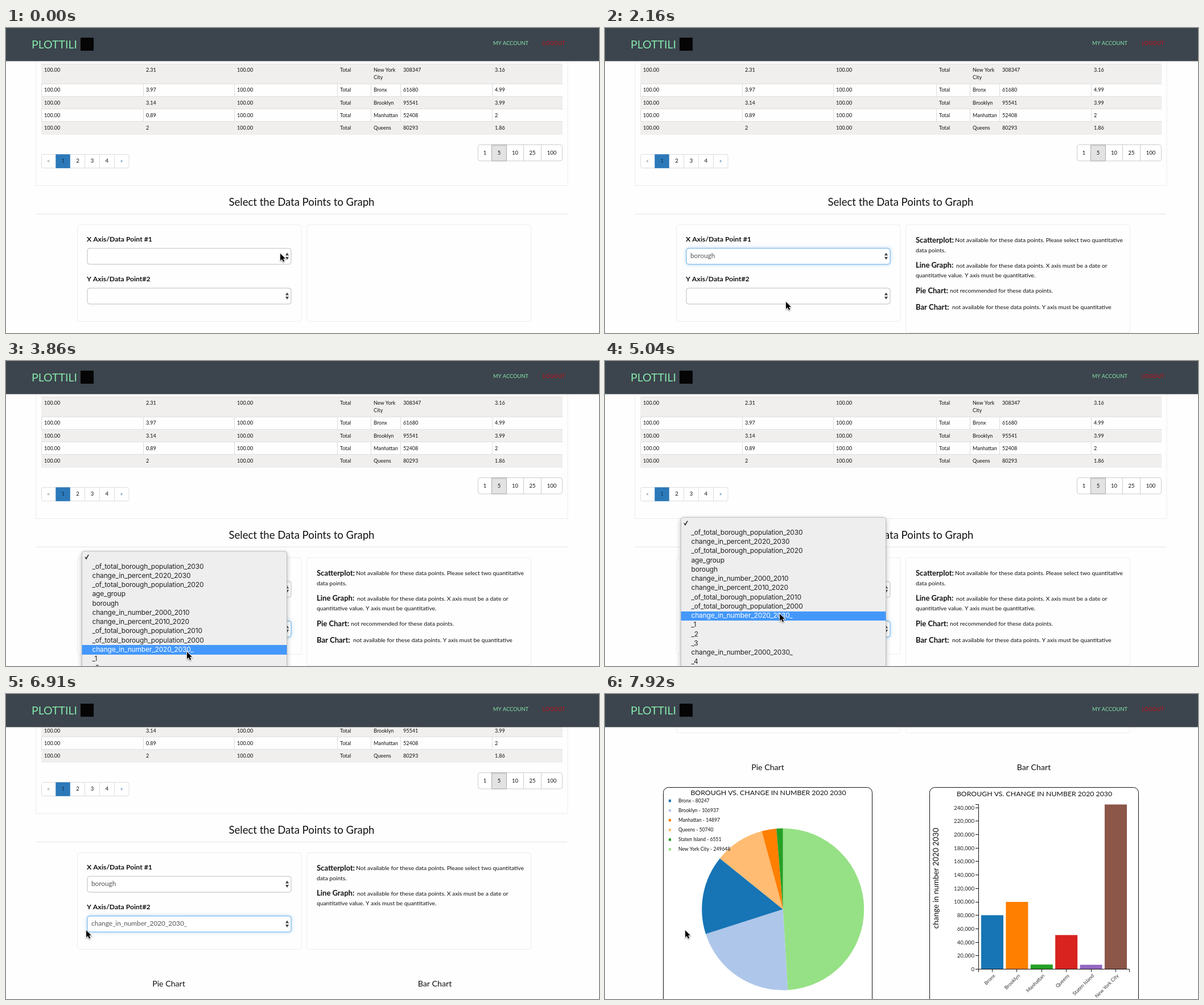
Animation, 1042 px wide and 537 px high, one loop 8000 ms. Source, as an HTML page with a canvas:

```html
<!DOCTYPE html>
<html lang="en">
<head>
<meta charset="utf-8">
<title>Data point selection</title>
<style>
html, body { margin: 0; width: 100%; height: 100%; overflow: hidden; background: #fefefe; }
canvas { display: block; width: 1042px; height: 537px; }
</style>
</head>
<body>
<canvas id="stage"></canvas>
<script>
const W = 1042, H = 537, LOOP = 8000;
const canvas = document.getElementById('stage');
const ctx = canvas.getContext('2d');
const ratio = window.devicePixelRatio || 1;
canvas.width = W * ratio;
canvas.height = H * ratio;

const SANS = 'Lato, sans-serif', MENU_FONT = 'Inter, sans-serif';
const ROW = 16.25;

const options = ['', '_of_total_borough_population_2030', 'change_in_percent_2020_2030',
  '_of_total_borough_population_2020', 'age_group', 'borough', 'change_in_number_2000_2010',
  'change_in_percent_2010_2020', '_of_total_borough_population_2010',
  '_of_total_borough_population_2000', 'change_in_number_2020_2030_', '_1', '_2', '_3',
  'change_in_number_2000_2030_', '_4', '_5'];

const cities = [
  ['2.31', 'New York', '308347', '3.16'],
  ['3.97', 'Bronx', '61680', '4.99'],
  ['3.14', 'Brooklyn', '95541', '3.99'],
  ['0.89', 'Manhattan', '52408', '2'],
  ['2', 'Queens', '80293', '1.86']
];

const legend = [
  ['Bronx', 80247, '#1775b5'], ['Brooklyn', 106937, '#aec6ea'], ['Manhattan', 14897, '#ff7f00'],
  ['Queens', 50740, '#ffbc72'], ['Staten Island', 6551, '#24a024'], ['New York City', 249648, '#96e185']
];
const sliceOrder = [5, 1, 0, 3, 2, 4];
const barHeights = [80247, 100000, 6900, 50740, 6551, 244800];
const barColors = ['#1775b5', '#ff7f00', '#24a024', '#d8231f', '#9467c0', '#8c5649'];

// Pointer path: time, x, y
const pointer = [
  [0, 482, 397], [150, 482, 398], [320, 455, 401], [490, 400, 407], [660, 352, 413], [830, 330, 420],
  [1130, 326, 455], [1270, 322, 466], [1420, 316, 477], [1570, 313, 483],
  [2020, 318, 482], [2180, 327, 480], [2330, 338, 478], [2490, 349, 475], [2640, 356, 473],
  [3120, 352, 490], [3265, 340, 514], [3410, 330, 528],
  [3710, 326, 530], [3855, 318, 512], [4000, 312, 491],
  [4450, 311, 481], [4600, 310, 471], [4750, 309, 460], [4890, 308, 451], [5040, 307, 445],
  [5940, 290, 442], [6120, 228, 431], [6290, 168, 420], [6470, 141, 416]
];
const scrolls = [[0, 0], [6910, 67], [7060, 141], [7250, 226], [7430, 298], [7600, 355], [7770, 407], [7920, 448]];
const menuTops = [[0, 390], [2940, 460], [3710, 400], [3855, 335], [4000, 275.3]];

function held(keys, t) {
  let k = keys[0];
  for (const key of keys) if (key[0] <= t) k = key;
  return k;
}

function text(str, x, y, size, o = {}) {
  ctx.font = `${o.weight || 400} ${size}px ${o.font || SANS}`;
  ctx.letterSpacing = o.spacing || '0px';
  ctx.fillStyle = o.color || '#111';
  ctx.textAlign = o.align || 'left';
  ctx.fillText(str, x, y + size * 0.35);
}

function rotated(str, x, y, angle, size, o) {
  ctx.save();
  ctx.translate(x, y);
  ctx.rotate(angle);
  text(str, 0, 0, size, o);
  ctx.restore();
}

function fill(x, y, w, h, color) {
  ctx.fillStyle = color;
  ctx.fillRect(x, y, w, h);
}

function box(x, y, w, h, r, stroke, color) {
  ctx.beginPath();
  ctx.roundRect(x, y, w, h, r);
  if (color) { ctx.fillStyle = color; ctx.fill(); }
  if (stroke) { ctx.strokeStyle = stroke; ctx.lineWidth = 1; ctx.stroke(); }
}

function shadowBox(x, y, w, h, r, color, shadow, blur, drop) {
  ctx.save();
  ctx.shadowColor = shadow;
  ctx.shadowBlur = blur * ratio;
  ctx.shadowOffsetY = drop * ratio;
  box(x, y, w, h, r, null, color);
  ctx.restore();
}

function path(points, color) {
  ctx.beginPath();
  points.forEach(([x, y], i) => i ? ctx.lineTo(x, y) : ctx.moveTo(x, y));
  ctx.closePath();
  ctx.fillStyle = color;
  ctx.fill();
}

function drawNav() {
  fill(0, 0, W, 58.4, '#3c444d');
  text('PLOTTILI', 45, 29, 19.5, { color: '#86e8ac' });
  fill(131, 17, 23, 23, '#050505');
  text('MY ACCOUNT', 856, 27, 9.3, { color: '#86e8ac' });
  text('LOGOUT', 943, 27, 9.5, { color: '#c4101a' });
}

function drawTable() {
  const cols = [62, 241, 401, 582, 641, 693, 854];
  const rowTop = i => i ? Math.round(76.5 + 22.2 * i) : 64;
  box(52.5, -200.5, 934.5, 478, 0, '#ececec');
  cities.forEach(([pct, name, count, share], i) => {
    const top = rowTop(i), h = rowTop(i + 1) - top;
    if (i % 2 === 0) fill(62, top, 916, h, '#f0efee');
    else cols.forEach(x => fill(x, top, 1, h, '#dcdcdc'));
    fill(62, top - 1, 916, 1, '#dfdfdf');
    const y = i ? 87 + 22.2 * i : 74;
    ['100.00', pct, '100.00', 'Total', name, count, share]
      .forEach((s, c) => text(s, cols[c] + 5, y, 9));
    if (!i) text('City', 646, 87, 9);
  });
}

function drawPagers() {
  box(62.5, 222.5, 153.5, 24, 3, '#ddd', '#fff');
  [112.5, 138.5, 164.5, 190.5].forEach(x => fill(x - .5, 223, 1, 24, '#ddd'));
  fill(87.3, 222.4, 25.4, 24.4, '#2c79b9');
  ['«', '1', '2', '3', '4', '»'].forEach((s, i) =>
    text(s, 74.5 + 25.7 * i, 234, 9.5, { align: 'center', color: ['#777', '#14304a', '#111', '#111', '#111', '#2c6ca8'][i] }));

  box(829.5, 205.5, 148, 28.5, 4, '#ccc', '#fff');
  box(853.5, 205.5, 26, 28.5, 0, '#adadad', '#e3e3e3');
  fill(854, 206, 25, 2, '#d2d2d2');
  [909, 940].forEach(x => fill(x, 206, 1, 28, '#ccc'));
  ['1', '5', '10', '25', '100'].forEach((s, i) =>
    text(s, [841.5, 866.5, 894.5, 925, 959][i], 219.5, 9.5, { align: 'center' }));
}

function drawSelect(y, value, focused) {
  if (focused) shadowBox(143, y + .5, 358, 28, 4, '#fff', 'rgba(102,175,233,.6)', 7, 0);
  box(143, y + .5, 358, 28, 4, focused ? '#66afe9' : '#bdbdbd', '#fff');
  text(value, 150, y + 13.5, 11.8, { color: '#555' });
  path([[491, y + 13], [494, y + 8], [497, y + 13]], '#444');
  path([[491, y + 15.5], [497, y + 15.5], [494, y + 20.5]], '#444');
}

function drawInfo(t) {
  const items = [
    ['Scatterplot:', 615, 373.5, 'Not available for these data points. Please select two quantitative', 'data points.'],
    ['Line Graph:', 617, 418, 'not available for these data points. X axis must be a date or', 'quantitative value. Y axis must be quantitative.'],
    ['Pie Chart:', 606, 462.5, 'not recommended for these data points.', ''],
    ['Bar Chart:', 610, 491.5, 'not available for these data points. Y axis must be quantitative', '']
  ];
  items.slice(0, t < 5940 ? 4 : 2).forEach(([head, x, y, first, second]) => {
    text(head, 546, y - .5, 13, { weight: 700 });
    text(first, x, y, 10.3);
    text(second, 546, y + 17.5, 10.3);
  });
}

function drawForm(t) {
  const chosen = t >= 1870, plotted = t >= 5940;
  text('Select the Data Points to Graph', 519.5, 306.5, 18.5, { align: 'center' });
  fill(53, 327, 933, 1, '#e2e2e2');
  box(125.5, 346.5, 393.5, 170, 4, '#ededed');
  box(528.5, 346.5, 394, chosen && !plotted ? 190 : 170, 4, '#ededed');
  text('X Axis/Data Point #1', 142, 372, 12.2, { weight: 700 });
  text('Y Axis/Data Point#2', 142, 442, 12.2, { weight: 700 });
  drawSelect(387.5, chosen ? 'borough' : '', t >= 150 && t < 2940);
  drawSelect(457.5, plotted ? options[10] : '', t >= 3120);
  if (chosen) drawInfo(t);
}

function drawPie() {
  const cx = 312.7, cy = 827, r = 142.5;
  const total = legend.reduce((sum, item) => sum + item[1], 0);
  text('Pie Chart', 286, 577.5, 14.2, { align: 'center' });
  box(102.5, 612.5, 367, 480, 9, '#111', '#fff');
  text('BOROUGH VS. CHANGE IN NUMBER 2020 2030', 287, 622, 12.3, { align: 'center' });
  let angle = -Math.PI / 2;
  for (const i of sliceOrder) {
    const next = angle + legend[i][1] / total * 2 * Math.PI;
    ctx.beginPath();
    ctx.moveTo(cx, cy);
    ctx.arc(cx, cy, r, angle, next);
    ctx.fillStyle = legend[i][2];
    ctx.fill();
    angle = next;
  }
  legend.forEach(([name, value, color], i) => {
    const y = 635.8 + 17.1 * i;
    fill(112, y - 2, 4, 4.5, color);
    text(`${name} - ${value}`, 129, y, 8.55);
  });
}

function drawBars() {
  const base = 932.5, unit = 284.3 / 240000;
  text('Bar Chart', 753.5, 577.5, 14.2, { align: 'center' });
  box(570.5, 612.5, 367, 480, 9, '#111', '#fff');
  text('BOROUGH VS. CHANGE IN NUMBER 2020 2030', 754.5, 623.5, 12.3, { align: 'center' });
  rotated('change in number 2020 2030', 581, 772.5, -Math.PI / 2, 13.7, { align: 'center' });

  barHeights.forEach((v, i) => {
    const x = 661 + 43.4 * i;
    fill(x, base - v * unit, 39, v * unit, barColors[i]);
    fill(Math.round(x + 19), base, 1, 5, '#111');
    rotated(legend[i][0], x + 23, 942.5, -Math.PI / 4, 8.7, { align: 'right', color: '#333' });
  });
  for (let v = 0; v <= 240000; v += 20000) {
    const y = base - v * unit;
    fill(651, Math.round(y - .5), 5, 1, '#111');
    text(v.toLocaleString('en-US'), 649, y, 9.7, { align: 'right', color: '#222' });
  }
  ctx.strokeStyle = '#111';
  ctx.lineWidth = 1;
  ctx.beginPath();
  ctx.moveTo(651, 642.5);
  ctx.lineTo(656.5, 642.5);
  ctx.lineTo(656.5, 937.5);
  ctx.moveTo(656.5, base);
  ctx.lineTo(921.5, base);
  ctx.lineTo(921.5, 937.5);
  ctx.stroke();
}

function drawMenu(top, pointerY) {
  const first = top + 2.8;
  const active = Math.floor((pointerY - first) / ROW);
  const h = H + 40 - top;
  shadowBox(133.5, top, 360, h, 4, '#eeeeee', 'rgba(0,0,0,.32)', 9, 3);
  box(133.5, top, 360, h, 4, '#bdbdbd');
  options.forEach((name, i) => {
    const rowTop = Math.round(first + ROW * i);
    const y = first + ROW * (i + .5) - .7, on = i === active;
    const color = on ? '#fff' : '#222';
    if (on) fill(133.5, rowTop, 360, Math.round(first + ROW * (i + 1)) - rowTop, '#4498fb');
    text(name, 151.5, y, 12, { font: MENU_FONT, color, spacing: '-0.17px' });
    if (i) return;
    ctx.beginPath();
    ctx.moveTo(139, y);
    ctx.lineTo(141, y + 3);
    ctx.lineTo(145, y - 4);
    ctx.strokeStyle = color;
    ctx.lineWidth = 1.5;
    ctx.stroke();
  });
}

function drawPointer(x, y) {
  const arrow = [[0, 0], [0, 12.5], [2.9, 9.9], [5, 14.6], [7.2, 13.6], [5.1, 9], [9, 9]];
  ctx.save();
  ctx.translate(x, y);
  ctx.shadowColor = 'rgba(0,0,0,.4)';
  ctx.shadowBlur = 2 * ratio;
  ctx.shadowOffsetY = ratio;
  path(arrow, '#000');
  ctx.strokeStyle = '#fff';
  ctx.lineWidth = 1.8;
  ctx.stroke();
  ctx.restore();
  path(arrow.map(([a, b]) => [x + a, y + b]), '#000');
}

function draw(t) {
  const [, px, py] = held(pointer, t);
  ctx.setTransform(ratio, 0, 0, ratio, 0, 0);
  fill(0, 0, W, H, '#fefefe');
  ctx.save();
  ctx.translate(0, -held(scrolls, t)[1]);
  drawTable();
  drawPagers();
  drawForm(t);
  if (t >= 5940) {
    drawPie();
    drawBars();
  }
  ctx.restore();
  drawNav();
  const open = (t >= 150 && t < 1870) || (t >= 2940 && t < 5940);
  if (open) drawMenu(held(menuTops, t)[1], py);
  drawPointer(px, py);
}

const start = performance.now();
function tick() {
  draw((performance.now() - start) % LOOP);
  requestAnimationFrame(tick);
}
tick();
</script>
</body>
</html>
```
